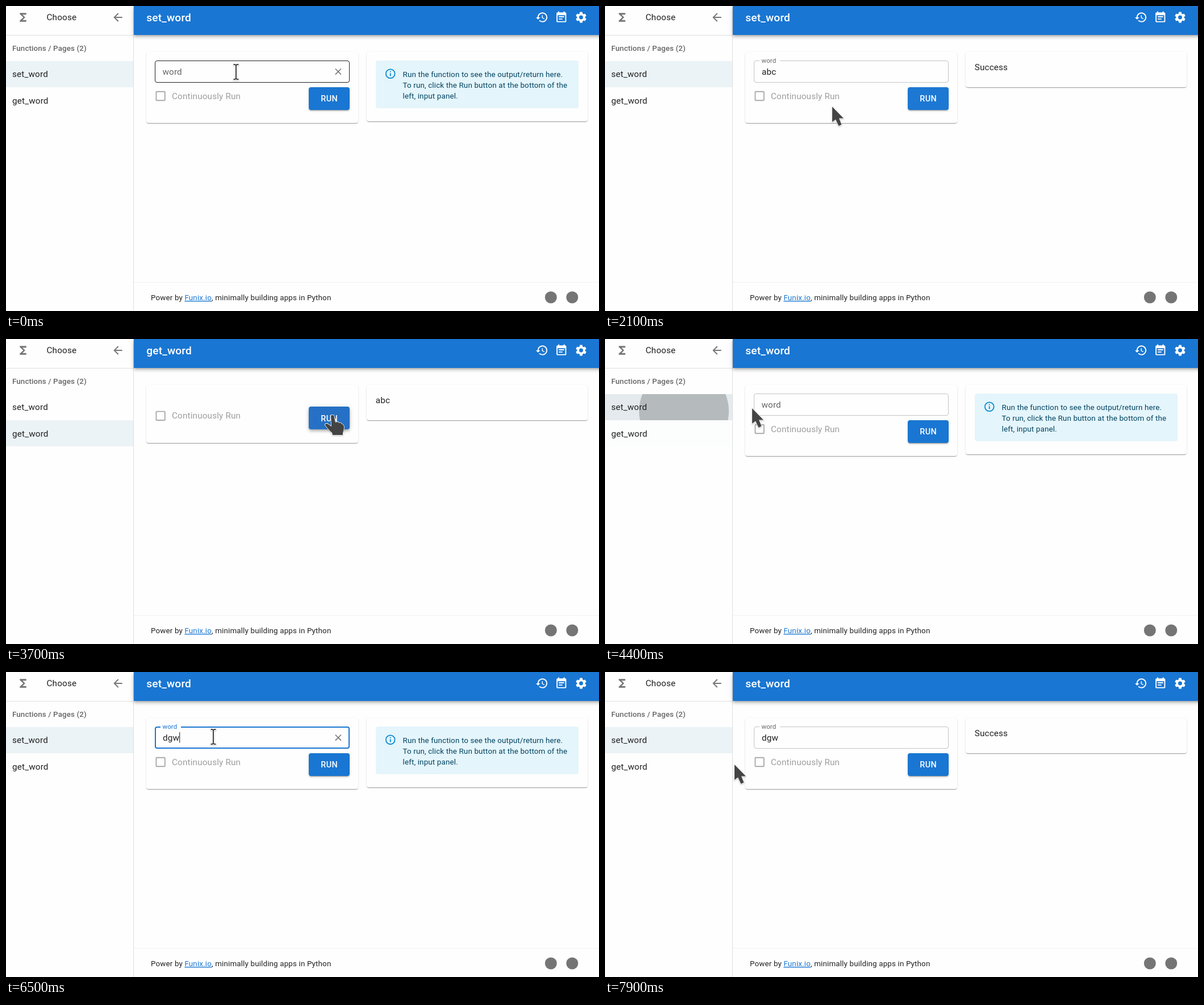
Write an HTML page that moves like this. It is 1044 px wide and 537 px high and loops after 8000 ms.

```html
<!DOCTYPE html>
<html lang="en">
<head>
<meta charset="utf-8">
<title>set_word</title>
<style>
html, body { margin: 0; width: 100%; height: 100%; overflow: hidden; background: #fefefe; }
#stage { position: relative; width: 1044px; height: 537px; overflow: hidden; }
#stage div, svg { position: absolute; box-sizing: border-box; }
#side { left: 0; top: 0; width: 225px; height: 537px; border-right: 1px solid #dfdfdf; }
#rule { left: 0; top: 51px; width: 224px; height: 1px; background: #dfdfdf; }
#bar { left: 225px; top: 0; width: 830px; height: 51px; background: #1976d2;
  box-shadow: 0 2px 4px -1px rgba(0,0,0,.2), 0 4px 5px rgba(0,0,0,.14), 0 1px 10px rgba(0,0,0,.12); }
#foot { left: 225px; top: 486px; width: 819px; height: 1px; background: #f0f0f0; }
.row { left: 0; width: 224px; height: 46px; overflow: hidden; }
.row i, .row b { position: absolute; inset: 0; opacity: 0; }
.row i { background: #ebf3f6; }
.row b { background: #000; }
.card { background: #fefefe; border-radius: 4px; top: 81px;
  box-shadow: 0 2px 1px -1px rgba(0,0,0,.2), 0 1px 1px rgba(0,0,0,.14), 0 1px 3px rgba(0,0,0,.12); }
#panel { left: 247px; width: 373px; }
#out { left: 635px; width: 389px; }
#alert { left: 651px; top: 96px; width: 357px; height: 84px; border-radius: 4px; background: #e4f5fb; }
#field { left: 262px; top: 96px; width: 343px; height: 39px; border-radius: 4px; border: 1px solid #c4c4c4; }
#notch { left: 272px; top: 95px; height: 4px; background: #fefefe; }
#btn { left: 533px; width: 72px; height: 40px; border-radius: 4px; overflow: hidden; }
.rip { border-radius: 50%; }
svg { left: 0; top: 0; }
text { font-family: Roboto, "Open Sans", sans-serif; font-size: 15.3px; letter-spacing: .00938em; fill: #212121; white-space: pre; }
.small { font-size: 13.4px; letter-spacing: .01071em; }
.sub { font-size: 13.4px; font-weight: 500; letter-spacing: .00714em; fill: #666; }
.title { font-size: 19.14px; font-weight: 500; letter-spacing: .0075em; fill: #fff; }
.run { font-size: 14.36px; font-weight: 500; letter-spacing: .02857em; fill: #fff; }
.info { fill: #014361; }
.off { fill: #9e9e9e; }
.link { fill: #1976d2; text-decoration: underline; text-decoration-color: #69a6e2; }
.cur { fill: #444; stroke: #fff; stroke-width: 1.6; stroke-linejoin: round; paint-order: stroke;
  filter: drop-shadow(0 1px 1px rgba(0,0,0,.25)); }
</style>
</head>
<body>
<div id="stage">
  <div id="side"></div>
  <div class="row" id="rowSet" style="top:97px"><i></i><b></b><div class="rip"></div></div>
  <div class="row" id="rowGet" style="top:143px"><i></i><b></b><div class="rip"></div></div>
  <div id="rule"></div>
  <div id="bar"></div>
  <div id="foot"></div>
  <div class="card" id="panel"></div>
  <div class="card" id="out"></div>
  <div id="alert"></div>
  <div id="field"></div>
  <div id="notch"></div>
  <div id="btn"><div class="rip"></div></div>
  <svg width="1044" height="537" viewBox="0 0 1044 537">
    <g fill="#757575">
      <path transform="translate(18.5 8.5) scale(.957)" d="M18 4H6v2l6.5 6L6 18v2h12v-3h-7l5-5-5-5h7z"/>
      <path transform="translate(185.5 8.5) scale(.957)" d="M20 11H7.83l5.59-5.59L12 4l-8 8 8 8 1.41-1.41L7.83 13H20v-2z"/>
      <circle cx="959.3" cy="513" r="10.5"/>
      <circle cx="996.8" cy="513" r="10.5"/>
    </g>
    <g fill="#fff">
      <path transform="translate(932 8.5) scale(.957)" d="M13 3c-4.97 0-9 4.03-9 9H1l3.89 3.89.07.14L9 12H6c0-3.87 3.13-7 7-7s7 3.13 7 7-3.13 7-7 7c-1.93 0-3.68-.79-4.94-2.06l-1.42 1.42C8.27 19.99 10.51 21 13 21c4.97 0 9-4.03 9-9s-4.03-9-9-9zm-1 5v5l4.28 2.54.72-1.21-3.5-2.08V8H12z"/>
      <path transform="translate(966.3 8.5) scale(.957)" d="M17 10H7v2h10v-2zm2-7h-1V1h-2v2H8V1H6v2H5c-1.11 0-2 .9-2 2v14c0 1.1.89 2 2 2h14c1.1 0 2-.9 2-2V5c0-1.1-.9-2-2-2zm0 16H5V8h14v11zm-5-5H7v2h7v-2z"/>
      <g id="gear" transform="translate(1012.5 20) scale(.957)">
        <circle r="5.5" fill="none" stroke="#fff" stroke-width="3.8"/>
      </g>
    </g>
    <text x="71.5" y="25">Choose</text>
    <text class="sub" x="11" y="79">Functions / Pages (2)</text>
    <text x="11" y="125">set_word</text>
    <text x="11" y="171.5">get_word</text>
    <text class="title" id="title" x="247.3" y="26.5"></text>
    <text class="small" x="255" y="518">Power by <tspan class="link">Funix.io</tspan>, minimally building apps in Python</text>
    <g id="hint">
      <path fill="#0288d1" transform="translate(666.2 108.7) scale(.877)" d="M11 9h2V7h-2m1 13a8 8 0 0 1 0-16 8 8 0 0 1 0 16m0-18a10 10 0 0 0 0 20 10 10 0 0 0 0-20m-1 15h2v-6h-2z"/>
      <text class="small info" x="698.5" y="124.5">Run the function to see the output/return here.</text>
      <text class="small info" x="698.5" y="143.7">To run, click the Run button at the bottom of the</text>
      <text class="small info" x="698.5" y="162.9">left, input panel.</text>
    </g>
    <text id="result" x="650.7" y="112.5"></text>
    <g id="controls">
      <rect x="264.4" y="150.8" width="15.4" height="15.4" rx="1" fill="none" stroke="#aaa" stroke-width="1.9"/>
      <text class="off" x="292" y="163.7">Continuously Run</text>
      <text class="run" x="554.3" y="168.2">RUN</text>
    </g>
    <g id="entry">
      <text id="label">word</text>
      <text id="value" x="276" y="120.5"></text>
      <rect id="caret" y="106" width="1.1" height="18.5" fill="#212121"/>
      <path id="clear" fill="#757575" transform="translate(575.3 106) scale(.797)" d="M19 6.41 17.59 5 12 10.59 6.41 5 5 6.41 10.59 12 5 17.59 6.41 19 12 13.41 17.59 19 19 17.59 13.41 12z"/>
    </g>
    <g id="cursor">
      <path class="cur" id="arrow" d="M0 0V27L6 22.5 11.5 34 16.500 31.500 12 20.500H20Z"/>
      <path class="cur" id="hand" d="M-3 2C-3-1 2-1 2.500 2L5 13C8 11 11 12 11 14 14 13 16 14 16 16 19 16 19 18 20 20 20 25 19 29 18 31V35H0L-1 31C-5 28-9 23-13 18-14 15-10 14-8 16L-2 20Z"/>
      <path class="cur" id="beam" d="M-4.500-14H-1.500L0-13 1.500-14H4.500V-12H2L1-11V11L2 12H4.500V14H1.500L0 13-1.500 14H-4.500V12H-2L-1 11V-11L-2-12H-4.500Z"/>
    </g>
  </svg>
</div>
<script>
const $ = id => document.getElementById(id);
const LOOP = 8000, STEP = 100;
const clamp = v => Math.max(0, Math.min(1, v));
const within = (t, a, b) => t >= a && t < b;
const show = (id, on) => { $(id).style.display = on ? '' : 'none'; };

function bezier(x1, y1, x2, y2) {
  const at = (a, b, u) => 3 * a * u * (1 - u) ** 2 + 3 * b * u * u * (1 - u) + u ** 3;
  return v => {
    const x = clamp(v);
    let lo = 0, hi = 1;
    for (let i = 0; i < 24; i++) {
      const mid = (lo + hi) / 2;
      if (at(x1, x2, mid) < x) lo = mid; else hi = mid;
    }
    return at(y1, y2, (lo + hi) / 2);
  };
}
const easeInOut = bezier(.4, 0, .2, 1), easeOut = bezier(0, 0, .2, 1);

// pointer path: time, x, y
const path = [
  [0, 405, 116], [1150, 405, 116], [1220, 460, 132], [1300, 578, 173], [1400, 588, 179], [1800, 585, 179],
  [2000, 480, 180], [2300, 240, 172], [2450, 135, 167], [2580, 111, 166], [2610, 113, 166], [2700, 140, 162],
  [2900, 262, 152], [3100, 480, 140], [3250, 570, 135], [3400, 575, 134], [3800, 575, 134], [3950, 450, 132],
  [4100, 170, 128], [4195, 139, 127], [4270, 155, 127], [4400, 259, 122], [4600, 362, 115], [4680, 365, 114],
  [6500, 365, 114], [6700, 470, 140], [6850, 560, 163], [6950, 575, 166], [7400, 572, 166],
  [7600, 430, 170], [7800, 275, 167], [7900, 228, 163]
];
const typed = [[0, ''], [500, 'a'], [1000, 'ab'], [1200, 'abc'], [4300, ''], [5700, 'd'], [6100, 'dg'], [6300, 'dgw']];
const carets = [[200, 1200], [4800, 5900], [6100, 6800]];
const focus = [[60, 1600], [4690, 7050]];

function pointer(t) {
  const i = path.findIndex(p => p[0] > t);
  if (i < 0) return path[path.length - 1].slice(1);
  if (i === 0) return path[0].slice(1);
  const [a, ax, ay] = path[i - 1], [b, bx, by] = path[i], k = (t - a) / (b - a);
  return [ax + (bx - ax) * k, ay + (by - ay) * k];
}
const onGetPage = t => within(t, 2650, 4300);

function target(t) {
  const [x, y] = pointer(t), get = onGetPage(t), top = get ? 119 : 143;
  if (x < 224 && y >= 97 && y < 189) return y < 143 ? 'rowSet' : 'rowGet';
  if (within(x, 533, 605) && within(y, top, top + 40)) return 'btn';
  if (!get && within(x, 262, 605) && within(y, 96, 135)) return 'field';
  return '';
}
const hover = (t, id) => [0, 1, 2].reduce((s, k) => s + (target(t - k * STEP) === id), 0) / 3;

function ripple(id, t, presses, color) {
  const el = $(id).querySelector('.rip');
  const hit = presses.find(p => within(t, p[0], p[1] + 550));
  el.style.display = hit ? '' : 'none';
  if (!hit) return;
  const [down, up, x, y, size] = hit;
  const p = easeInOut((t - down) / 550), r = size * p;
  Object.assign(el.style, {
    left: x - r + 'px', top: y - r + 'px', width: 2 * r + 'px', height: 2 * r + 'px', background: color,
    opacity: (.1 + .2 * p) * (1 - easeInOut((t - up) / 550))
  });
}

function rows(t) {
  const get = clamp((t - 2700) / 150) - clamp((t - 4270) / 150);
  for (const [id, sel] of [['rowSet', 1 - get], ['rowGet', get]]) {
    $(id).querySelector('i').style.opacity = sel;
    $(id).querySelector('b').style.opacity = target(t) === id || target(t - STEP) === id ? .04 : 0;
  }
  ripple('rowSet', t, [[4195, 4350, 139, 30, 143]], '#000');
  ripple('rowGet', t, [[2580, 2650, 111, 23, 116]], '#000');
}

function entry(t, get) {
  for (const id of ['entry', 'field', 'notch']) show(id, !get);
  const span = focus.find(f => within(t, f[0], f[1])), text = typed.filter(k => k[0] <= t).pop()[1];
  const over = target(t) === 'field';
  const age = span ? t - span[0] : text ? 1000 : 0;
  const k = easeOut(age / 200);
  $('field').style.border = span ? '2px solid #1976d2' : '1px solid ' + (over ? '#212121' : '#c4c4c4');
  $('notch').style.width = 36 * clamp((age - 50) / 100) + 'px';
  $('label').setAttribute('transform', `translate(275.4 ${121.3 - 21.3 * k}) scale(${1 - .25 * k})`);
  $('label').style.fill = span ? '#1976d2' : '#666';
  $('value').textContent = text;
  $('caret').setAttribute('x', 276 + (text ? $('value').getComputedTextLength() : 0));
  show('caret', carets.some(c => within(t, c[0], c[1])));
  show('clear', span || over);
}

function button(t, get) {
  const h = hover(t, 'btn'), mix = (a, b) => Math.round(a + (b - a) * h);
  Object.assign($('btn').style, {
    top: (get ? 119 : 143) + 'px',
    background: `rgb(${mix(25, 21)},${mix(118, 101)},${mix(210, 192)})`,
    boxShadow: `0 ${3 - h}px ${1 + 3 * h}px ${h - 2}px rgba(0,0,0,.2), 0 ${2 + 2 * h}px ${2 + 3 * h}px rgba(0,0,0,.14), 0 1px ${5 + 5 * h}px rgba(0,0,0,.12)`
  });
  ripple('btn', t, [[1600, 1680, 53, 36, 68], [3350, 3440, 42, 15, 52], [7050, 7140, 42, 23, 52]], '#fff');
}

function output(t) {
  const text = within(t, 1700, 2650) || t >= 7400 ? 'Success' : within(t, 3500, 4300) ? 'abc' : '';
  $('result').textContent = text;
  show('hint', !text);
  show('alert', !text);
  $('out').style.height = (text ? 62 : 122) + 'px';
}

function draw(t) {
  const get = onGetPage(t), [x, y] = pointer(t), over = target(t);
  $('title').textContent = get ? 'get_word' : 'set_word';
  $('panel').style.height = (get ? 102 : 125) + 'px';
  $('controls').setAttribute('transform', `translate(0 ${get ? -23.2 : 0})`);
  rows(t);
  entry(t, get);
  button(t, get);
  output(t);
  $('cursor').setAttribute('transform', `translate(${x} ${y})`);
  show('beam', over === 'field');
  show('hand', over && over !== 'field');
  show('arrow', !over);
}

for (let a = 0; a < 360; a += 60)
  $('gear').insertAdjacentHTML('beforeend', `<path transform="rotate(${a})" d="M-3.1-5.500-2.300-9.800H2.300L3.100-5.500Z"/>`);

const start = performance.now();
function tick() {
  const t = (performance.now() - start) % LOOP;
  draw(Math.floor(t / STEP) * STEP);
  requestAnimationFrame(tick);
}
tick();
</script>
</body>
</html>
```
